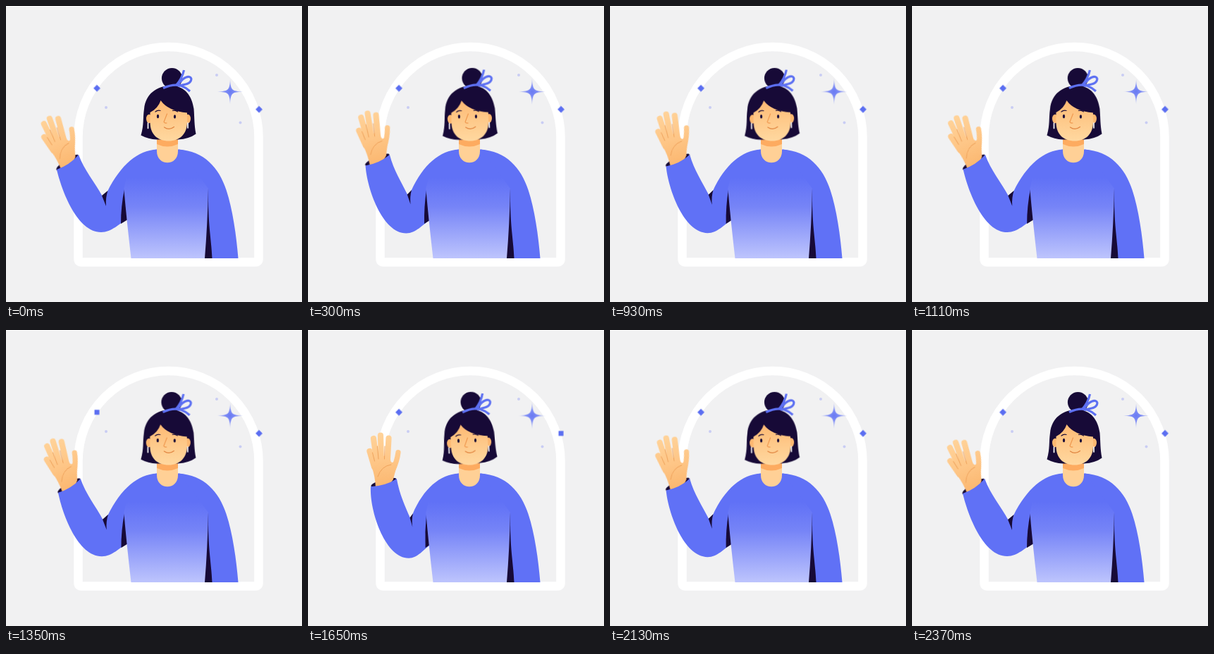
An HTML page for the animation above (2400 ms loop, 420 by 420 pixels).

```html
<!DOCTYPE html>
<html lang="en">
<head>
<meta charset="utf-8">
<title>Waving woman</title>
<style>
  html, body { margin: 0; width: 100%; height: 100%; overflow: hidden; background: #f1f1f2; }
  svg { display: block; width: 100vw; height: 100vh; }

  .sway { animation: 600ms cubic-bezier(.5, 0, .5, 1) infinite alternate; }
  .hand { animation-name: wave; transform-origin: 114.5px 283px; }
  .head { animation-name: tilt; transform-origin: 229px 202px; }
  .star { animation-name: pulse; transform-origin: 318px 121.5px; }
  .arm { animation-name: arm; }
  .fold { animation-name: fold; }
  .pit { animation-name: pit; }
  .gem { fill: #5b6ef1; transform: rotate(45deg); transform-box: fill-box; transform-origin: center; }
  .gem.a { animation: spinA 1200ms infinite; }
  .gem.b { animation: spinB 1200ms infinite; }

  @keyframes wave { from { transform: rotate(-18.2deg); } to { transform: rotate(2.1deg); } }
  @keyframes tilt { to { transform: rotate(-2.8deg); } }
  @keyframes pulse { from { transform: scale(.95); } to { transform: scale(1.04); } }
  @keyframes arm {
    from { d: path("M214 203.5C187 205 163 225 144 263L136.5 269.5C126 250 111 233 103 211Q90 226 72 232C79 262 101 321 135 321C150 321 160 309 176 300L190 240Z"); }
    to { d: path("M214 203.5C187 205 164 225 149 261L146 266.5C139 250 132 233 128.5 211Q112 221 91 221C88 255 110 324 144 324C156 324 164 312 176 303L190 240Z"); }
  }
  @keyframes fold {
    from { d: path("M144.5 262L136 269L142 284Q141 272 144.5 262Z"); }
    to { d: path("M149.500 260L145.500 266L149 279Q147.500 269 149.500 260Z"); }
  }
  @keyframes pit {
    from { d: path("M168 260Q163 284 163 309L176 301Z"); }
    to { d: path("M168 262Q166 286 167 309L176 303Z"); }
  }
  @keyframes spinA {
    0% { transform: rotate(45deg); animation-timing-function: cubic-bezier(.5, 0, .5, 1); }
    25%, 100% { transform: rotate(135deg); }
  }
  @keyframes spinB {
    0%, 25% { transform: rotate(45deg); animation-timing-function: cubic-bezier(.5, 0, .5, 1); }
    50%, 100% { transform: rotate(135deg); }
  }
</style>
</head>
<body>
<svg viewBox="0 0 420 420">
  <defs>
    <linearGradient id="shirt" gradientUnits="userSpaceOnUse" x1="0" y1="244" x2="0" y2="360">
      <stop offset="0" stop-color="#6071f6"/>
      <stop offset=".35" stop-color="#7684f7"/>
      <stop offset="1" stop-color="#bfc6fd"/>
    </linearGradient>
    <linearGradient id="palm" gradientUnits="userSpaceOnUse" x1="102" y1="148" x2="110" y2="224">
      <stop offset="0" stop-color="#ffd298"/>
      <stop offset=".5" stop-color="#fec687"/>
      <stop offset="1" stop-color="#fbb66e"/>
    </linearGradient>
    <linearGradient id="face" gradientUnits="userSpaceOnUse" x1="0" y1="132" x2="0" y2="192">
      <stop offset="0" stop-color="#fdb871"/>
      <stop offset=".5" stop-color="#fec98a"/>
      <stop offset="1" stop-color="#ffd8a0"/>
    </linearGradient>
    <radialGradient id="glow" gradientUnits="userSpaceOnUse" cx="318" cy="121.5" r="19">
      <stop offset="0" stop-color="#6a7bf3"/>
      <stop offset=".45" stop-color="#8290f5"/>
      <stop offset="1" stop-color="#d3d8f7"/>
    </radialGradient>
  </defs>

  <path fill="#f1f1f2" d="M0 0H420V420H0Z"/>
  <path fill="#fff" d="M0 0H420V1H0Z"/>
  <path fill="none" stroke="#fff" stroke-width="12.5"
    d="M102.5 186A128 128 0 0 1 358.5 186V359Q358.5 363.5 354 363.5H107Q102.5 363.5 102.5 359Z"/>

  <g fill="#c9cdf4">
    <circle cx="299" cy="98" r="2"/>
    <circle cx="142" cy="144" r="2"/>
    <circle cx="332.5" cy="165.5" r="2"/>
  </g>
  <path class="sway star" fill="url(#glow)" transform-origin="318 121.5"
    d="M318 102.5C319 119.5 320 120.5 337 121.5C320 122.5 319 123.5 318 140.5C317 123.5 316 122.5 299 121.5C316 120.5 317 119.5 318 102.5Z"/>
  <rect class="gem a" x="125.500" y="113.200" width="7" height="7"/>
  <rect class="gem b" x="355.500" y="143.200" width="7" height="7"/>

  <g class="sway hand">
    <ellipse cx="107.500" cy="216.500" rx="18.700" ry="4.500" fill="#170a37" transform="rotate(-16 107.5 216.5)"/>
    <g fill="none" stroke="url(#palm)" stroke-width="8.200" stroke-linecap="round">
      <path d="M94 194L87.500 172"/>
      <path d="M98 190L93 154"/>
      <path d="M104 190L103 149.500"/>
      <path d="M112.500 190L114.500 153.500"/>
      <path stroke-width="7.200" d="M120 200Q126.500 186 128 173.500"/>
    </g>
    <path fill="url(#palm)"
      d="M90 193L94 180L116.500 178L117.300 186Q119 189.500 121.500 187L127 190Q123 203 121 212Q116 221 106 224H96Q95.500 208 90 193Z"/>
    <path fill="none" stroke="#ec9f57" stroke-width=".9" stroke-linecap="round"
      d="M91.500 174L94.500 186M98.500 165L100 183M109 165L108.500 183M99 208Q104 193 118 191"/>
  </g>

  <path class="sway arm" fill="#6071f6"
    d="M214 203.5C187 205 163 225 144 263L136.5 269.5C126 250 111 233 103 211Q90 226 72 232C79 262 101 321 135 321C150 321 160 309 176 300L190 240Z"/>
  <path class="sway fold" fill="#170a37" d="M144.5 262L136 269L142 284Q141 272 144.5 262Z"/>
  <path class="sway pit" fill="#170a37" d="M168 260Q163 284 163 309L176 301Z"/>

  <path fill="url(#shirt)"
    d="M214 203.500C198 206 184 217 174 230L167.300 259Q171 302 177.500 358H284L290 250L270 216Q258 205 245 203.500Z"/>
  <path fill="#170a37" d="M287 259Q286 310 282 358H294L290 300Z"/>
  <path fill="#6071f6"
    d="M245 203.500C281 206 302 229 312.500 261C321.500 288 327 326 329.500 358H292.500C291.500 330 286 310 287.200 259L262 225Z"/>

  <path fill="#ffd096" d="M214 184H244V206C244 216.500 237 222.300 229 222.300C221 222.300 214 216.500 214 206Z"/>
  <path fill="#fdab60" d="M214 184H244V196Q229 203 214 196Z"/>

  <g class="sway head">
    <circle cx="235.500" cy="102.500" r="14.600" fill="#170a37"/>
    <path fill="#170a37"
      d="M191.500 183.500C196 168 194 160 196 146C198 125 214 113 234 113C254 113 264 128 266.500 146C267.500 160 267 168 269.500 181.500Q260 188.500 244 189.500H214Q202 189 191.500 183.500Z"/>
    <ellipse cx="203" cy="160" rx="4" ry="6.300" fill="#fdb871"/>
    <ellipse cx="258" cy="160" rx="4" ry="6.300" fill="#fdb871"/>
    <path fill="url(#face)"
      d="M204.500 151Q216 145 219.500 134Q230 149 257 151.500V165C257 182 246 191.500 231 191.500C215 191.500 204.500 182 204.500 165Z"/>
    <path fill="none" stroke="#fff" stroke-width="1.700" stroke-linecap="round" d="M201.500 166V173.500M258 166V173"/>
    <g fill="#170a37">
      <ellipse cx="215.500" cy="156.500" rx="1.600" ry="2.700"/>
      <ellipse cx="239.500" cy="157" rx="1.600" ry="2.700"/>
    </g>
    <g fill="none" stroke-linecap="round">
      <path stroke="#170a37" stroke-width="1.200" d="M212 150Q215 147.500 219 148.500M236.500 148.500Q240 147.500 243.500 150"/>
      <path stroke="#ee964c" stroke-width="1.100" d="M228.500 153L224 164.500Q225 166.500 228 166"/>
      <path stroke="#e08440" stroke-width="1.200" d="M224.500 172Q231.500 177 238.500 171.500"/>
      <g stroke="#5d70f2" stroke-width="3.200" stroke-linecap="butt">
        <path d="M223 116.500Q237 110 248 113Q255 115.500 261 121"/>
        <path d="M252.500 91Q250 103 241 113"/>
        <path d="M243 113.500C247 106 255 99.500 260 100.500C266 102.500 262 109.500 255 111Q249 112.500 244 113.500"/>
      </g>
    </g>
  </g>
</svg>
</body>
</html>
```
